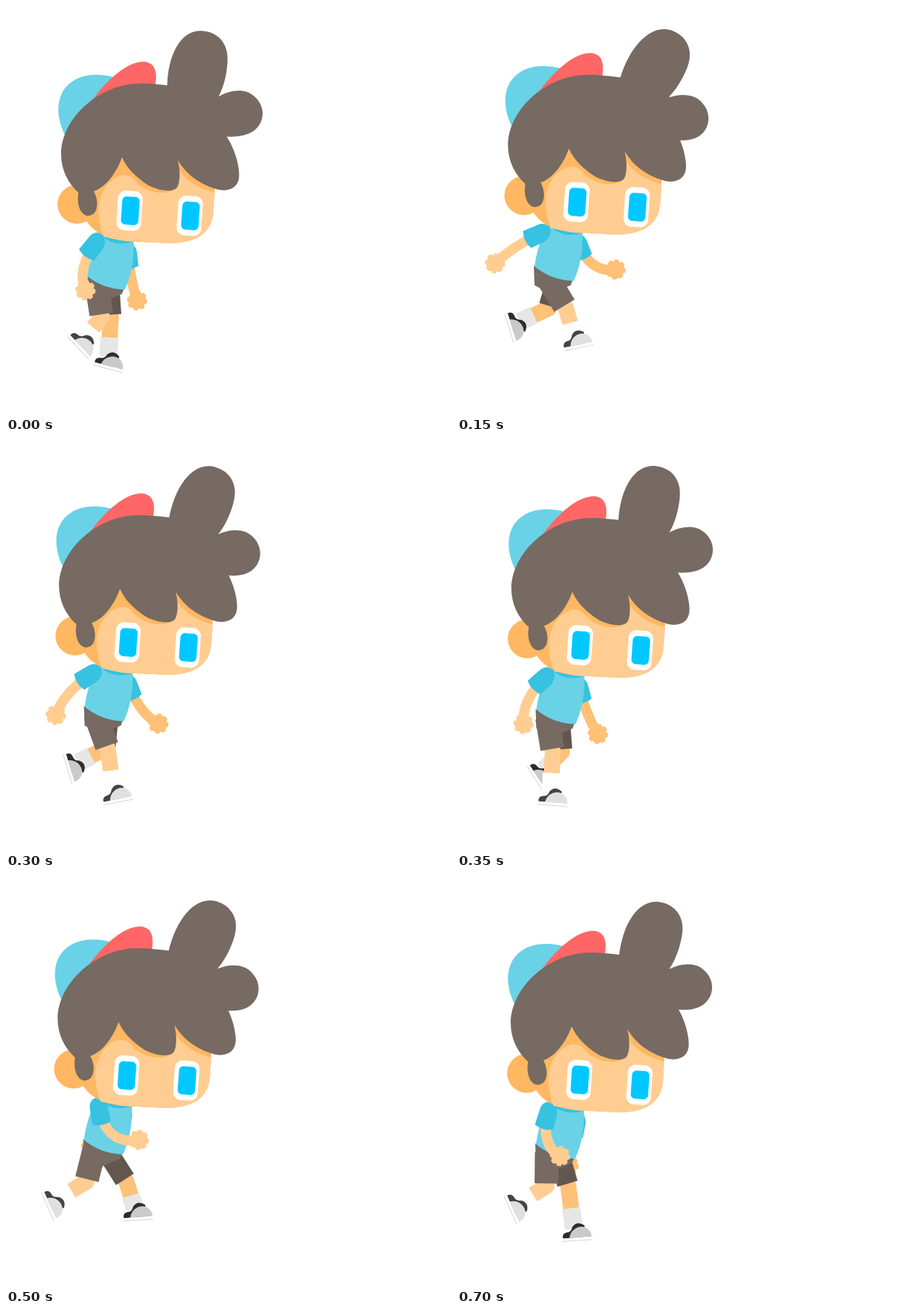
Write an HTML page with a canvas that moves like this. It is 614 px wide and 564 px high and loops after 750 ms.

```html
<!DOCTYPE html>
<html lang="en">
<head>
<meta charset="utf-8">
<title>Running boy</title>
<style>
  html, body { margin: 0; width: 100%; height: 100%; overflow: hidden; background: #fff; }
  canvas { display: block; }
</style>
</head>
<body>
<canvas id="stage" width="614" height="564"></canvas>
<script>
const ctx = document.getElementById('stage').getContext('2d');
const STEP = 50, STEPS = 15, HALF = STEPS / 2;

const HAIR = '#766a62', CYAN = '#69d2e7', TEAL = '#36c2e0', RED = '#ff6766';
const SKIN = '#ffcd91', SHADE = '#ffb761';

// Each side: colours, then where its joints rest and how far they swing
const NEAR = {
  skin: SKIN, shorts: HAIR, shortsWidth: 33, sock: '#fff', shoe: '#444', toe: '#e0e0e0',
  hip: [125, 383], kneeX: 130, footX: 109,
  shoulder: [126, 324], shoulderSwing: 4,
  elbow: [104, 363], elbowSwing: [35, 20],
  hand: [116, 379], handSwing: 74, handBounce: 14, tuck: -8
};
const FAR = {
  skin: '#ffc077', shorts: '#62564f', shortsWidth: 29, sock: '#e6e6e6', shoe: '#2d2d2d', toe: '#cacaca',
  hip: [142, 388], kneeX: 147, footX: 131,
  shoulder: [167, 336], shoulderSwing: 1,
  elbow: [163, 382], elbowSwing: [30, 0],
  hand: [172, 390], handSwing: 58, handBounce: 17, tuck: 10
};

const shape = Object.fromEntries(Object.entries({
  cap: 'M82,180C66,148 70,118 92,104C106,94 128,93 148,98L150,140Z',
  brim: 'M117,133C140,100 168,77 190,77C206,78 210,92 205,114L150,130Z',
  face: 'M104,225L130,195L280,195L288,253L286,285C284,314 262,328 225,328L165,325C138,322 118,312 108,292Z',
  light: 'M135,319C124,290 123,252 154,236C168,230 177,238 182,246C196,257 215,262 230,255L240,228C250,243 270,254 288,258L286,285C284,314 262,328 225,328L165,325Z',
  hair: 'M76,205C76,155 130,105 190,107C215,108 255,112 292,126L306,150L304,180C318,200 324,230 321,240C318,254 302,257 290,253C270,247 250,235 237,213C241,230 240,245 236,251C228,260 205,253 195,247C180,237 167,225 160,209C155,225 140,250 121,256C129,270 127,290 113,290C103,289 97,275 100,258C85,245 76,225 76,205Z',
  tuft: 'M223,125C219,80 235,34 268,34C295,35 307,55 305,78C304,95 300,112 293,125L258,150Z',
  bun: 'M293,125C310,115 330,113 342,124C358,137 358,160 342,172C332,179 318,181 303,180L260,150Z',
  shirt: 'M128,312C118,335 112,355 110,372Q133,391 164,392C172,375 178,350 176,320Z',
  collar: 'M130,316Q149,334 175,326L170,312Z',
  pelvis: 'M109,371Q135,388 163,390L160,398Q140,406 133,410L110,398Z',
  sleeve: 'M-12,4C-12,-15 10,-15 13,4L13,25Q0,31 -13,25Z',
  upper: 'M-20,-4Q-21,-11 -14,-12Q-8,-12 -6,-19Q1,-28 11,-20L8,-4Z',
  toe: 'M-11,-4C-8,-22 18,-25 20,-4Z'
}).map(([name, d]) => [name, new Path2D(d)]));

// One swing per stride, and one rebound per footfall
const wave = (t, peak) => Math.cos(2 * Math.PI * (t - peak) / STEPS);
const rebound = t => Math.cos(2 * Math.PI * t / HALF);

const mix = (a, b, u) => [a[0] + (b[0] - a[0]) * u, a[1] + (b[1] - a[1]) * u];
const rad = deg => deg * Math.PI / 180;

function fill(path, color) {
  ctx.fillStyle = color;
  ctx.fill(path);
}

function line(points, width, color) {
  ctx.beginPath();
  points.forEach(p => ctx.lineTo(...p));
  ctx.lineWidth = width;
  ctx.strokeStyle = color;
  ctx.stroke();
}

function disc(x, y, r, color) {
  ctx.beginPath();
  ctx.arc(x, y, r, 0, 2 * Math.PI);
  ctx.fillStyle = color;
  ctx.fill();
}

function box(x, y, w, h, r, color) {
  ctx.beginPath();
  ctx.roundRect(x - w / 2, y - h / 2, w, h, r);
  ctx.fillStyle = color;
  ctx.fill();
}

function at(x, y, angle, draw) {
  ctx.save();
  ctx.translate(x, y);
  ctx.rotate(angle);
  draw();
  ctx.restore();
}

function around(x, y, deg, draw) {
  at(x, y, rad(deg), () => { ctx.translate(-x, -y); draw(); });
}

function leg(side, t, bob) {
  const hip = [side.hip[0] + bob / 4, side.hip[1] + bob];
  const knee = [side.kneeX + 21 * wave(t, 3.5), 430 + bob];
  const x = side.footX + 66 * wave(t, 4.1);
  const y = 478 + bob + 24 * wave(t, 5.3) + 9 * rebound(t);
  const angle = rad(31 + 52 * wave(t, 12));
  const cos = Math.cos(angle), sin = Math.sin(angle);
  const ankle = [x - 4 * cos + 17 * sin, y - 4 * sin - 17 * cos];

  line([hip, knee, ankle], 22, side.skin);
  line([mix(knee, ankle, 0.52), ankle], 25, side.sock);
  line([hip, mix(hip, knee, 0.92)], side.shortsWidth, side.shorts);
  at(x, y, angle, () => {
    fill(shape.upper, side.shoe);
    fill(shape.toe, side.toe);
    line([[-21, -2], [21, -2]], 4, '#fff');
    line([[-21, 0], [21, 0]], 1, '#d4d4d4');
  });
}

function arm(side, t, bob) {
  const swing = wave(t, 11.3), bounce = rebound(t), tuck = side.tuck * bounce;
  const sx = side.shoulder[0] + bob / 4 + side.shoulderSwing * swing;
  const sy = side.shoulder[1] + bob;
  const ex = side.elbow[0] + side.elbowSwing[0] * swing + tuck;
  const ey = side.elbow[1] + bob + side.elbowSwing[1] * swing;
  const hx = side.hand[0] + side.handSwing * swing + tuck;
  const hy = side.hand[1] + bob + side.handBounce * bounce;

  ctx.beginPath();
  ctx.moveTo(sx, sy);
  ctx.quadraticCurveTo(ex, ey, hx, hy);
  ctx.lineWidth = 14;
  ctx.strokeStyle = side.skin;
  ctx.stroke();

  // Fist with softly scalloped knuckles
  disc(hx, hy, 12, side.skin);
  ctx.save();
  ctx.lineWidth = 4;
  ctx.lineCap = 'round';
  ctx.setLineDash([3, 6.4]);
  ctx.stroke();
  ctx.restore();

  at(sx, sy, Math.atan2(ey - sy, ex - sx) - Math.PI / 2, () => fill(shape.sleeve, TEAL));
}

function eye(x, y) {
  at(x, y, rad(4), () => {
    box(0, 0, 34, 55, 11, '#fff');
    box(1, 0, 24, 39, 6, '#00c8ff');
  });
}

function head(tilt) {
  fill(shape.cap, CYAN);
  fill(shape.brim, RED);
  disc(98, 274, 27, SHADE);
  fill(shape.face, SHADE);
  fill(shape.light, SKIN);
  eye(170.5, 283);
  eye(253.5, 290);
  around(250, 140, tilt, () => fill(shape.tuft, HAIR));
  around(210, 150, tilt / 2, () => fill(shape.bun, HAIR));
  fill(shape.hair, HAIR);
}

function draw(t) {
  const beat = t % HALF;
  const bob = -4 * Math.min(beat, HALF - beat);

  ctx.clearRect(0, 0, 614, 564);
  ctx.lineJoin = 'round';
  arm(FAR, t + HALF, bob);
  leg(FAR, t + HALF, bob);
  leg(NEAR, t, bob);
  at(bob / 4, bob, 0, () => {
    fill(shape.pelvis, HAIR);
    fill(shape.shirt, CYAN);
    fill(shape.collar, TEAL);
  });
  arm(NEAR, t, bob);
  at(bob * 0.47, bob, 0, () => head(12 - 12 * rebound(t - 0.35)));
}

function tick() {
  draw(Math.floor(performance.now() / STEP) % STEPS);
  requestAnimationFrame(tick);
}
tick();
</script>
</body>
</html>
```
